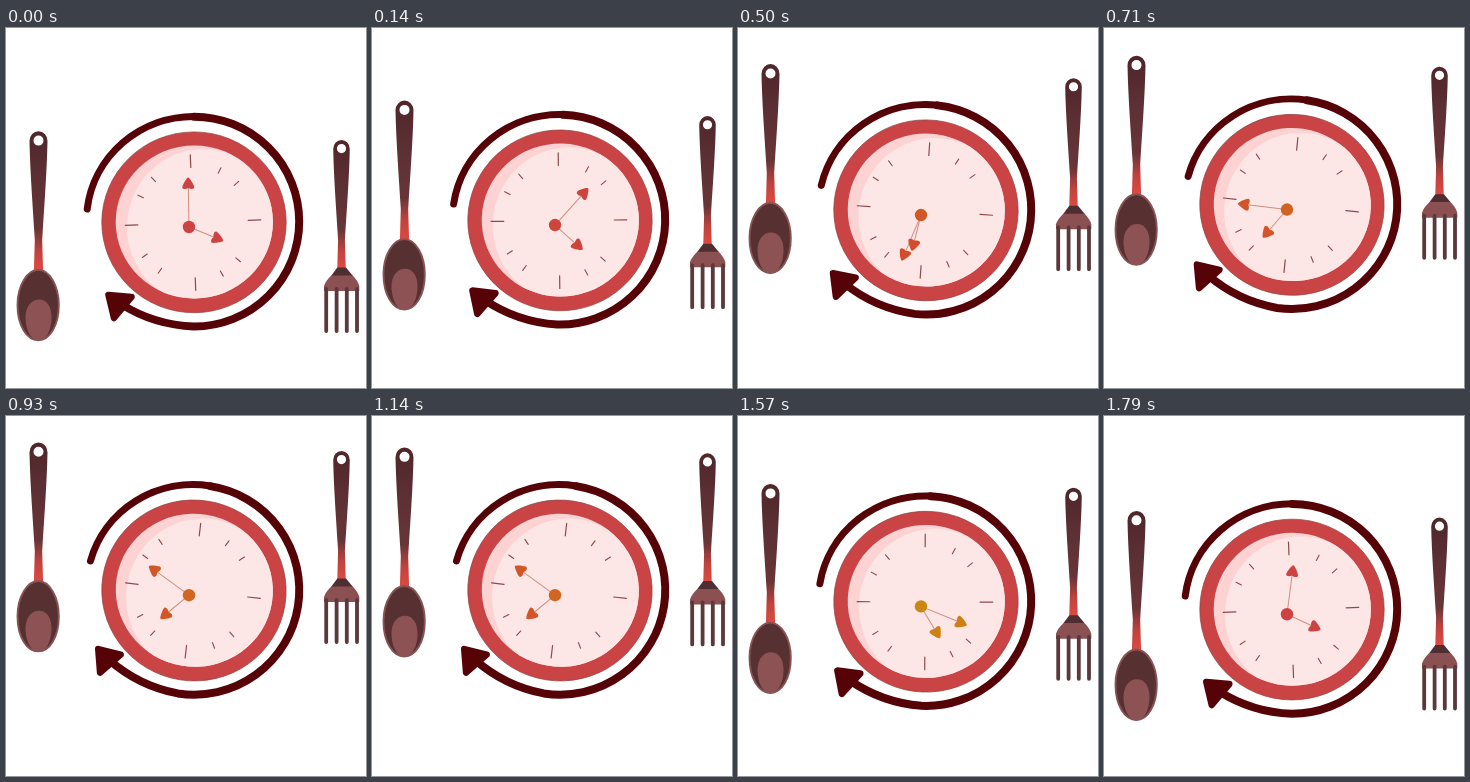
These frames come from a looping animation (360x360 px, 1870 ms). An HTML page:

```html
<!DOCTYPE html>
<html lang="en">
<head>
<meta charset="utf-8">
<title>Meal time</title>
<style>
  html, body { margin: 0; width: 100%; height: 100%; overflow: hidden; background: #fff; }
  svg { display: block; width: 100vw; height: 100vh; }
</style>
</head>
<body>
<svg viewBox="0 0 360 360">
  <defs>
    <linearGradient id="steel" x1="0" y1="0" x2="0" y2="1">
      <stop offset="0" stop-color="#50262a"/>
      <stop offset=".35" stop-color="#5c3034"/>
      <stop offset=".7" stop-color="#683537"/>
      <stop offset=".85" stop-color="#bd423e"/>
      <stop offset="1" stop-color="#e04a41"/>
    </linearGradient>
    <path id="handle" fill="url(#steel)" fill-rule="evenodd"
      d="M-9 1A9 9.8 0 0 1 9 1C8.5 30 5.5 70 3.7 100L4.6 131H-4.6L-3.7 100C-5.5 70 -8.5 30 -9 1ZM-5 .6A5 5 0 0 0 5 .6A5 5 0 0 0 -5 .6Z"/>
    <path id="heart" d="M0 -6C1.5 -6 6 2 6 3.6C6 6 2.4 6 0 4.4C-2.4 6 -6 6 -6 3.6C-6 2 -1.5 -6 0 -6Z"/>
    <clipPath id="dial"><ellipse cx="188.3" cy="194" rx="78.6" ry="76.5"/></clipPath>
  </defs>

  <g id="spoon">
    <use href="#handle" x="32.5" y="112"/>
    <path d="M32.3 241.8C43.5 241.8 52.8 258 52.8 277C52.8 298 43.5 312.2 32.3 312.2C21 312.2 11.5 298 11.5 277C11.5 258 21 241.8 32.3 241.8Z"
      fill="#573032" stroke="#875355" stroke-width="1.9"/>
    <path d="M33 271.5C41 271.5 45.5 279 45.5 289C45.5 302 40 312.5 32.5 312.5C25 312.5 19.5 302 19.5 289C19.5 279 25 271.5 33 271.5Z" fill="#8c5254"/>
  </g>

  <g id="fork">
    <use href="#handle" transform="translate(335.5 120) scale(.92)"/>
    <path d="M331.3 239.5H340L347 248H325Z" fill="#4f2d30"/>
    <path d="M325.3 247.5H346.7Q352 253 353.3 258V263H318V258Q319.5 253 325.3 247.5Z" fill="#8a5052"/>
    <path d="M320.2 261V303M330.6 261V303M340.8 261V303M351 261V303" stroke="#5a383b" stroke-width="3.8" stroke-linecap="round"/>
  </g>

  <g id="clock">
    <g fill="none" stroke="#560307" stroke-linecap="round">
      <path d="M81.2 181A107.5 104.8 0 0 1 188 88.5" stroke-width="7"/>
      <path d="M188 88.7A105.2 104.9 0 0 1 188 298.5Q148 297 115 276" stroke-width="8"/>
    </g>
    <path d="M102.5 267L125.5 269L108 290Z" fill="#560307" stroke="#560307" stroke-width="6.5" stroke-linejoin="round"/>
    <ellipse cx="188" cy="194.3" rx="92.2" ry="90.4" fill="#cb4445" stroke="#8f4142" stroke-width=".7"/>
    <g clip-path="url(#dial)">
      <rect x="100" y="110" width="180" height="170" fill="#fdd2d2"/>
      <ellipse cx="197" cy="199" rx="76" ry="78" fill="#fde6e6"/>
    </g>
    <g id="ticks" stroke="#8d4a4b" stroke-linecap="round"/>
  </g>

  <g id="hands">
    <g id="minute"><path d="M0 0V-40" stroke="#cf8f80"/><use href="#heart" y="-43.5"/></g>
    <g id="hour"><path d="M0 0V-28" stroke="#cf8f80"/><use href="#heart" y="-31"/></g>
    <circle id="hub" r="6.2"/>
  </g>
</svg>
<script>
const LOOP = 1870, FPS = 14, STEPS = 26;

const $ = id => document.getElementById(id);
const set = (id, name, value) => $(id).setAttribute(name, value);

// Soft landing at 1; a larger power makes a softer start.
const ease = (p, power) => 1 - (1 - Math.min(1, p) ** power) ** 2;

// Goes from 0 to 1 in the first `up` steps and back to 0 in the last `down` steps.
const swing = (up, upPower, down, downPower) => step =>
  step < up ? ease(step / up, upPower) : ease((STEPS - step) / down, downPower);

const motion = {
  spoon:  swing(11.8, .84, 13, 1.13),
  fork:   swing(13, .95, 12, 1.07),
  lift:   swing(13, 1.6, 8.5, 1.85),
  tilt:   swing(13, 1.25, 10, 2.05),
  minute: swing(13, 1.4, 9, 1.95),
  hour:   swing(13, 1.3, 10, 1.92)
};

function tick(angle, radius, half, width) {
  const line = document.createElementNS("http://www.w3.org/2000/svg", "path");
  line.setAttribute("d", `M0 ${-radius - half}V${-radius + half}`);
  line.setAttribute("transform", `translate(187 194.6) rotate(${angle})`);
  line.setAttribute("stroke-width", width);
  $("ticks").append(line);
}
[37.5, 50, 45, 37].forEach((middle, quarter) => {
  const angle = 90 * quarter;
  tick(angle - 2.3, 61.5, 6.3, 1.2);
  for (const side of [-10.5, 10.5]) tick(angle + middle + side, 58.5, 3, 1.1);
});

// Red at rest, orange while turning, with a flash of gold on the way back.
function warm(turn, step) {
  const hue = turn + 30 * Math.exp(-(((step - 22) / 1.5) ** 2));
  return `hsl(${hue} ${57 + hue * .7}% ${53 - hue * .25}%)`;
}

function draw(ms) {
  const step = Math.min(STEPS - 1, Math.floor((ms % LOOP + 5) * FPS / 1000));
  const p = {};
  for (const name in motion) p[name] = motion[name](step);
  const lift = -19.8 * p.lift;
  set("spoon", "transform", `translate(0 ${-76.8 * p.spoon})`);
  set("fork", "transform", `translate(0 ${-77 * p.fork})`);
  set("clock", "transform", `translate(0 ${lift}) rotate(${8.9 * p.tilt} 188 194)`);
  set("hands", "transform", `translate(183 ${199 + lift})`);
  set("minute", "transform", `rotate(${307 * p.minute - 1})`);
  set("hour", "transform", `rotate(${112 + 118.5 * p.hour})`);
  set("hands", "fill", warm(17 * p.hour, step));
  set("hub", "fill", warm(24 * p.hour, step));
}

const start = performance.now();
function frame() {
  draw(performance.now() - start);
  requestAnimationFrame(frame);
}
frame();
</script>
</body>
</html>
```
